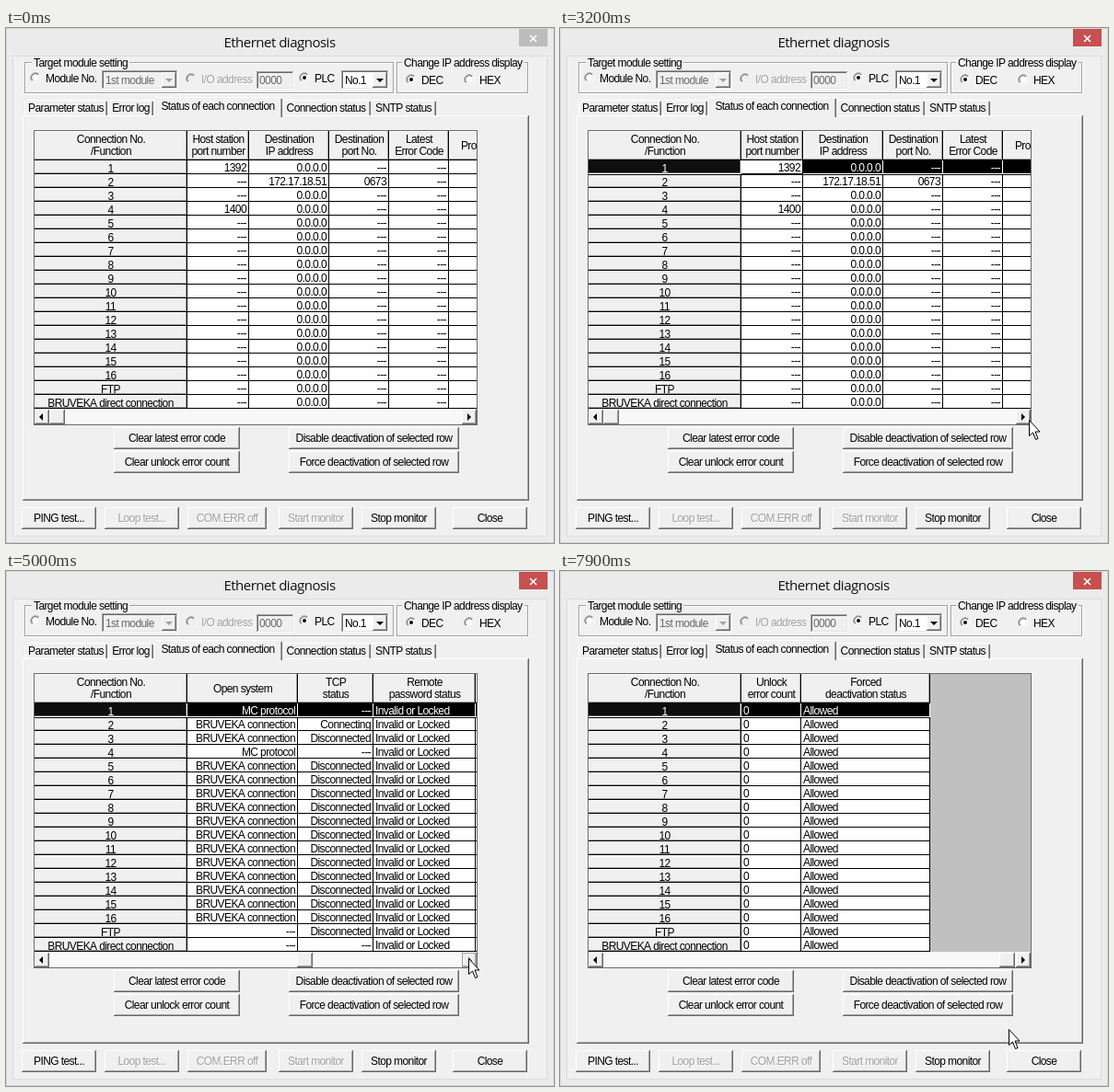
These frames come from a looping animation (595x560 px, 8000 ms). An HTML page with a canvas:

```html
<!DOCTYPE html>
<html lang="en">
<head>
<meta charset="utf-8">
<title>Ethernet diagnosis</title>
<style>
html, body { margin: 0; width: 100%; height: 100%; overflow: hidden; background: #ebebeb; }
canvas { display: block; }
</style>
</head>
<body>
<canvas id="stage" width="595" height="560"></canvas>
<script>
const ctx = document.getElementById('stage').getContext('2d');
const LOOP = 8000, STEP = 100;
const FACE = '#f0f0f0', SHADE = '#a0a0a0', DARK = '#696969';
const VENDOR = 'BRUVEKA';

// Table contents; every cell function receives the row number 1..18
const rowNames = [...Array(16).keys()].map(i => String(i + 1)).concat('FTP', VENDOR + ' direct connection');
const isUdp = r => r === 1 || r === 4;
const columns = [
  { w: 67, head: ['Host station', 'port number'], cell: r => ({ 1: '1392', 4: '1400' })[r] || '---' },
  { w: 87, head: ['Destination', 'IP address'], cell: r => r === 2 ? '172.17.18.51' : '0.0.0.0' },
  { w: 65, head: ['Destination', 'port No.'], cell: r => r === 2 ? '0673' : '---' },
  { w: 65, head: ['Latest', 'Error Code'], cell: () => '---' },
  { w: 65, head: ['Protocol'], cell: r => r > 16 ? '---' : isUdp(r) ? 'UDP' : 'TCP' },
  { w: 120, head: ['Open system'], cell: r => r > 16 ? '---' : isUdp(r) ? 'MC protocol' : VENDOR + ' connection' },
  { w: 82, head: ['TCP', 'status'], cell: r => isUdp(r) || r === 18 ? '---' : r === 2 ? 'Connecting' : 'Disconnected' },
  { w: 111, head: ['Remote', 'password status'], cell: () => 'Invalid or Locked', left: true },
  { w: 65, head: ['Unlock', 'error count'], cell: () => '0', left: true },
  { w: 140, head: ['Forced', 'deactivation status'], cell: () => 'Allowed', left: true }
];

// Timeline
const scrollTimes = [3800, 4000, 4400, 4700, 5000, 5400, 5700, 6600];
const pressSpans = [[3700, 4100], [4400, 4500], [4700, 4800], [5000, 5100], [5700, 5800], [6600, 6700]];
const cursorKeys = [ // time, x, y
  [400, 576, 39], [600, 500, 58], [900, 280, 120], [1200, 157, 162], [1400, 143, 155],
  [1500, 137, 151], [1700, 130, 153], [2300, 130, 153], [2400, 180, 313], [2600, 325, 385],
  [2900, 480, 435], [3200, 509, 426], [3500, 502, 421], [7600, 502, 421],
  [7700, 493, 460], [7800, 480, 495], [7900, 487, 498]
];

function cursorAt(t) {
  const next = cursorKeys.findIndex(k => k[0] >= t);
  if (next < 1) return cursorKeys[0].slice(1);
  const [t0, x0, y0] = cursorKeys[next - 1], [t1, x1, y1] = cursorKeys[next];
  const p = (t - t0) / (t1 - t0);
  return [Math.round(x0 + (x1 - x0) * p), Math.round(y0 + (y1 - y0) * p)];
}

// Drawing helpers
function rect(x, y, w, h, color) {
  ctx.fillStyle = color;
  ctx.fillRect(x, y, w, h);
}

function useFont(font, spacing) {
  ctx.font = font;
  ctx.letterSpacing = spacing;
}

const useLabelFont = () => useFont('12px "Liberation Sans", Arial, sans-serif', '-0.6px');

function text(s, x, y, align = 'left', color = '#000') {
  useLabelFont();
  ctx.textAlign = align;
  ctx.fillStyle = color;
  ctx.fillText(s, x, y + 4);
}

function label(s, x, y, align, enabled = true) {
  if (!enabled) text(s, x + 1, y + 1, align, '#fff');
  text(s, x, y, align, enabled ? '#000' : SHADE);
}

function edges(x, y, w, h, topLeft, bottomRight) {
  rect(x, y, w, 1, topLeft);
  rect(x, y, 1, h, topLeft);
  rect(x, y + h - 1, w, 1, bottomRight);
  rect(x + w - 1, y, 1, h, bottomRight);
}

function raised(x, y, w, h) {
  rect(x, y, w, h, FACE);
  edges(x, y, w, h, '#fff', DARK);
  edges(x + 1, y + 1, w - 2, h - 2, FACE, SHADE);
}

function sunken(x, y, w, h, fill) {
  rect(x, y, w, h, fill);
  edges(x, y, w, h, SHADE, '#fff');
  edges(x + 1, y + 1, w - 2, h - 2, DARK, '#e3e3e3');
}

function polygon(points, fill, stroke) {
  ctx.beginPath();
  points.forEach(([x, y]) => ctx.lineTo(x, y));
  ctx.closePath();
  ctx.fillStyle = fill;
  ctx.fill();
  if (stroke) {
    ctx.strokeStyle = stroke;
    ctx.lineWidth = 1;
    ctx.stroke();
  }
}

function button(s, x, y, w, enabled = true) {
  raised(x, y, w, 24);
  label(s, x + w / 2, y + 12, 'center', enabled);
}

function groupBox(s, x, w, textX) {
  ctx.lineWidth = 1;
  ctx.strokeStyle = '#fff';
  ctx.strokeRect(x + 1.5, 38.5, w, 33);
  ctx.strokeStyle = SHADE;
  ctx.strokeRect(x + .5, 37.5, w, 33);
  useLabelFont();
  rect(textX - 2, 34, ctx.measureText(s).width + 4, 8, FACE);
  text(s, textX, 38);
}

function arc(x, y, r, from, to, color) {
  ctx.beginPath();
  ctx.arc(x, y, r, from, to);
  ctx.strokeStyle = color;
  ctx.stroke();
}

function disc(x, y, r, color) {
  ctx.beginPath();
  ctx.arc(x, y, r, 0, 7);
  ctx.fillStyle = color;
  ctx.fill();
}

function radio(s, x, y, checked, enabled = true) {
  const a = Math.PI * .75, b = Math.PI * 1.75;
  disc(x, y, 5, enabled ? '#fff' : FACE);
  ctx.lineWidth = 1;
  arc(x, y, 5.3, a, b, SHADE);
  arc(x, y, 5.3, b, a, '#fff');
  arc(x, y, 4.3, a, b, DARK);
  arc(x, y, 4.3, b, a, '#e3e3e3');
  if (checked) disc(x, y, 2, '#000');
  label(s, x + 11, y + 1, 'left', enabled);
}

function combo(s, x, w, enabled) {
  sunken(x, 46, w, 21, enabled ? '#fff' : FACE);
  text(s, x + 4, 57, 'left', enabled ? '#000' : DARK);
  raised(x + w - 18, 48, 16, 17);
  const cx = x + w - 10;
  polygon([[cx - 4, 55], [cx + 4, 55], [cx, 59]], enabled ? '#000' : SHADE);
}

function tab(s, x, w, selected) {
  const y = selected ? 75 : 78, h = 95 - y + (selected ? 2 : 0);
  rect(x, y, w, h, FACE);
  rect(x, y + 2, 1, h - 2, '#fff');
  rect(x + 2, y, w - 4, 1, '#fff');
  rect(x + w - 2, y + 2, 1, h - 2, SHADE);
  rect(x + w - 1, y + 2, 1, h - 2, DARK);
  text(s, x + w / 2, selected ? 85 : 87, 'center');
}

function drawWindow(active) {
  rect(0, 0, 595, 560, '#ebebeb');
  edges(0, 0, 595, 560, '#d6d6d6', '#d6d6d6');
  rect(7, 30, 581, 523, '#dcdcdc');
  rect(8, 31, 579, 521, FACE);
  rect(557, 1, 31, 19, active ? '#c75050' : '#bcbcbc');
  ctx.strokeStyle = '#fff';
  ctx.lineWidth = 1.6;
  ctx.beginPath();
  ctx.moveTo(569, 8); ctx.lineTo(576, 15);
  ctx.moveTo(576, 8); ctx.lineTo(569, 15);
  ctx.stroke();
  useFont('15px "Open Sans", "Noto Sans", sans-serif', '-0.5px');
  ctx.textAlign = 'center';
  ctx.fillStyle = '#111';
  ctx.fillText('Ethernet diagnosis', 297, 21);

  groupBox('Target module setting', 20, 400, 30);
  groupBox('Change IP address display', 424, 142, 432);
  radio('Module No.', 32, 54, false);
  combo('1st module', 104, 83, false);
  radio('I/O address', 201, 55, false, false);
  sunken(272, 47, 41, 20, FACE);
  text('0000', 275, 57, 'left', DARK);
  radio('PLC', 324, 54, true);
  combo('No.1', 364, 52, true);
  radio('DEC', 440, 56, true);
  radio('HEX', 503, 56, false);

  rect(18, 95, 550, 419, FACE);
  edges(18, 95, 550, 419, '#fff', DARK);
  edges(19, 96, 548, 417, FACE, SHADE);
  tab('Parameter status', 20, 90);
  tab('Error log', 111, 49);
  tab('Connection status', 299, 97);
  tab('SNTP status', 396, 71);
  tab('Status of each connection', 160, 140, true);

  button('Clear latest error code', 117, 434, 137);
  button('Clear unlock error count', 117, 460, 137);
  button('Disable deactivation of selected row', 307, 434, 185);
  button('Force deactivation of selected row', 307, 460, 185);
  button('PING test...', 17, 521, 81);
  button('Loop test...', 107, 521, 81, false);
  button('COM.ERR off', 197, 521, 86, false);
  button('Start monitor', 296, 521, 81, false);
  button('Stop monitor', 386, 521, 81);
  button('Close', 485, 521, 81);
}

function gridCell(x, y, w, h, header) {
  rect(x, y, w, h, '#000');
  rect(x, y, w - 1, h - 1, header ? FACE : '#fff');
  if (header) edges(x, y, w - 1, h - 1, '#fff', SHADE);
}

function headCell(lines, x, w) {
  gridCell(x, 112, w, 32, true);
  const top = lines.length > 1 ? 121 : 128;
  lines.forEach((s, i) => text(s, x + w / 2, top + 13 * i, 'center'));
}

function drawTable(scroll, selected) {
  edges(30, 111, 482, 321, DARK, DARK);
  rect(31, 112, 480, 303, '#c0c0c0');
  ctx.save();
  ctx.beginPath();
  ctx.rect(31, 112, 480, 302);
  ctx.clip();
  headCell(['Connection No.', '/Function'], 31, 166);
  rowNames.forEach((name, i) => {
    gridCell(31, 144 + 15 * i, 166, 15, true);
    text(name, 113.5, 153 + 15 * i, 'center');
  });
  let x = 197;
  for (const { w, head, cell, left } of columns.slice(scroll)) {
    headCell(head, x, w);
    rowNames.forEach((_, i) => {
      gridCell(x, 144 + 15 * i, w, 15);
      text(cell(i + 1), left ? x + 2 : x + w - 3, 152 + 15 * i, left ? 'left' : 'right');
    });
    x += w;
  }
  if (selected) {
    // The focused first cell stays plain while the rest of the row is inverted
    const start = scroll ? 197 : 264;
    rect(31, 159, Math.min(x, 511) - 31, 1, '#000');
    ctx.globalCompositeOperation = 'difference';
    rect(31, 144, 166, 15, '#fff');
    rect(start, 144, Math.min(x, 511) - start, 15, '#fff');
  }
  ctx.restore();
}

function drawScrollbar(scroll, pressed) {
  rect(31, 414, 480, 1, FACE);
  rect(31, 415, 480, 16, '#f8f8f8');
  raised(31, 415, 16, 16);
  polygon([[40, 419], [40, 427], [36, 423]], '#000');
  raised(47 + Math.round(53.8 * scroll), 415, 17, 16);
  raised(495, 415, 16, 16);
  if (pressed) edges(495, 415, 16, 16, SHADE, SHADE);
  const d = pressed ? 1 : 0;
  polygon([[501 + d, 419 + d], [501 + d, 427 + d], [505 + d, 423 + d]], '#000');
}

function drawCursor(x, y) {
  const shape = [[0, 0], [0, 17], [4, 13.5], [7, 21], [9.5, 20], [6.5, 12.5], [11.5, 12.5]];
  polygon(shape.map(([dx, dy]) => [x + dx + .5, y + dy + .5]), '#fff', '#000');
}

function draw(t) {
  const active = t >= 1900;
  const scroll = scrollTimes.filter(s => s <= t).length;
  const pressed = pressSpans.some(([from, to]) => t >= from && t < to);
  drawWindow(active);
  drawTable(scroll, active);
  drawScrollbar(scroll, pressed);
  if (t >= 400) drawCursor(...cursorAt(t));
}

let shown = -1;
function frame() {
  const t = Math.floor(performance.now() % LOOP / STEP) * STEP;
  if (t !== shown) draw(shown = t);
  requestAnimationFrame(frame);
}
frame();
</script>
</body>
</html>
```
